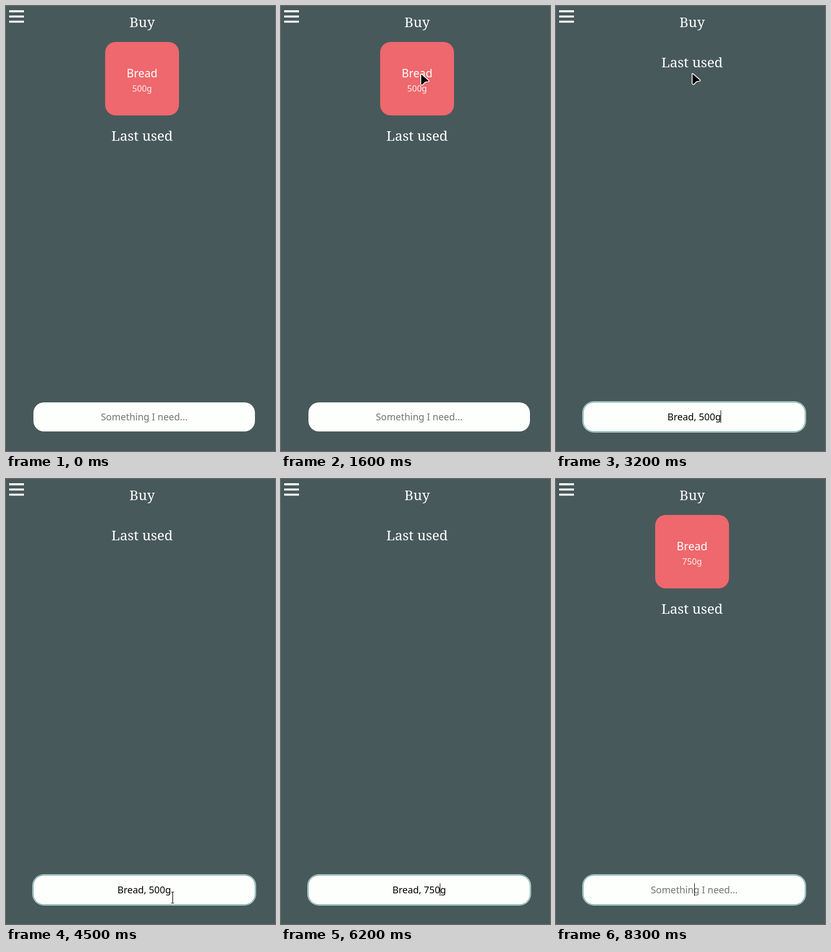
An HTML page that plays this animation: 510x842 px, repeating every 8.9 s.

```html
<!DOCTYPE html>
<html lang="en">
<head>
<meta charset="utf-8">
<title>Shopping list</title>
<style>
  html, body { margin: 0; width: 100%; height: 100%; overflow: hidden; background: #48595b; }
  svg { display: block; width: 510px; height: 842px; }
  text { font-family: "Noto Sans", sans-serif; text-anchor: middle; fill: #fff; }
  .head { font: 26px "Noto Serif", serif; }
  #name { font-size: 21px; }
  #amount { font-size: 16px; font-weight: 300; fill-opacity: .9; }
  #field { font-size: 18px; }
</style>
</head>
<body>
<svg viewBox="0 0 510 842">
  <path d="M6 10H34M6 19.8H34M6 29.6H34" stroke="#fff" stroke-width="3.8"/>
  <text class="head" x="258" y="40">Buy</text>
  <g id="card">
    <rect x="188" y="68" width="140" height="139" rx="20" fill="#ee686d"/>
    <text id="name" x="258" y="135">Bread</text>
    <text id="amount" x="258" y="162">500g</text>
  </g>
  <text class="head" id="last" x="258" y="255">Last used</text>

  <g id="ring">
    <rect x="50" y="748" width="424" height="59" rx="22" fill="#fdfffc"/>
    <rect x="51" y="749" width="422" height="57" rx="21" fill="#2c8584"/>
  </g>
  <rect x="52" y="750" width="420" height="55" rx="20" fill="#fdfffc"/>
  <text id="field" x="262" y="784"></text>
  <rect id="caret" y="765" width="1" height="24"/>

  <path id="arrow" d="M1 2Q1 0 2.8 1.2L16 12.6Q17.6 14.6 15 15.2Q10.5 15.2 8.4 17.2L5.6 20.4Q3.6 22.6 1.8 20.8Q1 20 1 19Z"
        stroke="#fff" stroke-width="1.6" stroke-linejoin="round"/>
  <g id="beam" fill="none">
    <path d="M-2.5 -10.5H2.5M0 -10.5V10.5M-2.5 10.5H2.5" stroke="#fff" stroke-width="3"/>
    <path d="M-2.5 -10.5H2.5M0 -10.5V10.5M-2.5 10.5H2.5" stroke="#000" stroke-width="1.2"/>
  </g>
</svg>
<script>
const LOOP = 8900;
const HINT = 'Something I need...';
const $ = id => document.getElementById(id);
const [card, amount, last, ring, field, caret, arrow, beam] =
  ['card', 'amount', 'last', 'ring', 'field', 'caret', 'arrow', 'beam'].map($);

// time, typed text, caret index
const edits = [
  [0, '', 0],
  [3200, 'Bread, 500g', 11],
  [4700, 'Bread, 500g', 10],
  [5000, 'Bread, 50g', 9],
  [5200, 'Bread, 5g', 8],
  [5300, 'Bread, g', 7],
  [6000, 'Bread, 7g', 8],
  [6100, 'Bread, 75g', 9],
  [6200, 'Bread, 750g', 10],
  [6600, '', 0]
];

// times at which the caret toggles
const blinks = [3200, 3700, 4000, 4500, 4700, 5800, 6000, 7000, 8100];

// time, pointer shape, x, y
const moves = [
  [0],
  [1200, arrow, 34, 415], [1300, arrow, 72, 352], [1400, arrow, 136, 264],
  [1500, arrow, 204, 184], [1600, arrow, 264, 128], [1700, arrow, 304, 109],
  [1800, arrow, 311, 112], [1900, arrow, 284, 121], [2000, arrow, 257, 127],
  [3700, arrow, 262, 190], [3800, arrow, 282, 420], [3900, arrow, 300, 660],
  [4000, beam, 316, 792], [5000],
  [7300, beam, 267, 784.5], [7400, beam, 272, 784.5],
  [8100, beam, 310, 776], [8200, beam, 352, 761], [8300]
];

const at = (list, t) => list.findLast(e => e[0] <= t);
const show = (el, on) => el.setAttribute('visibility', on ? 'visible' : 'hidden');

function draw(t) {
  const [, text, index] = at(edits, t);
  const editing = text !== '';
  show(card, !editing);
  last.setAttribute('y', editing ? 116 : 255);
  amount.textContent = t < 6600 ? '500g' : '750g';
  show(ring, t >= 3200);

  field.textContent = text || HINT;
  field.style.fill = editing ? '#000' : '#707470';
  const x = editing ? field.getEndPositionOfChar(index - 1).x : 262;
  caret.setAttribute('x', Math.floor(x));
  show(caret, blinks.filter(b => b <= t).length % 2);

  const [, shape, px, py] = at(moves, t);
  for (const p of [arrow, beam]) show(p, p === shape);
  if (shape) shape.setAttribute('transform', `translate(${px} ${py})`);
}

const start = performance.now();
function tick() {
  draw((performance.now() - start) % LOOP);
  requestAnimationFrame(tick);
}
tick();
</script>
</body>
</html>
```
